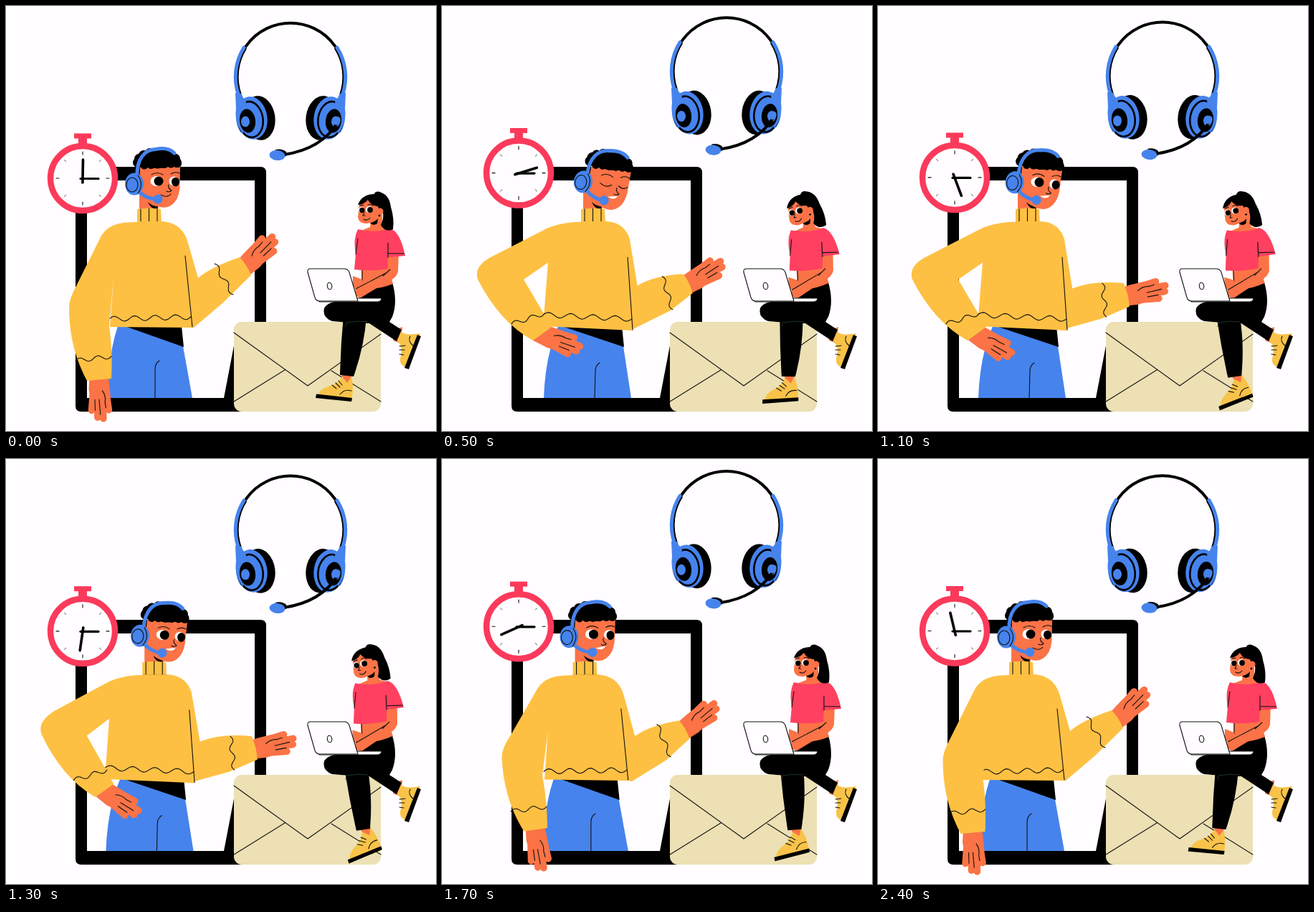
Animation, 600 px wide and 592 px high, one loop 2.5 s. Source, as an HTML page:

```html
<!DOCTYPE html>
<html lang="en">
<head>
<meta charset="utf-8">
<title>Customer support</title>
<style>
html, body { margin: 0; width: 100%; height: 100%; overflow: hidden; background: #fffdff; }
svg { display: block; width: 100vw; height: 100vh; }
.ink { fill: none; stroke: #111; stroke-width: 1.1; stroke-linecap: round; stroke-linejoin: round; }
.skin { fill: #fb7346; }
.blue { fill: #4683ec; }
.red { fill: #fb3a5b; }
.shirt { fill: #ff4060; }
.knit { fill: #fec043; }
.shoe { fill: #f8c348; }
.white { fill: #fffdff; }
.finger { fill: none; stroke: #fb7346; stroke-width: 9.5; stroke-linecap: round; }
.tube { fill: none; stroke: #4683ec; stroke-width: 5; stroke-linecap: round; }
</style>
</head>
<body>
<svg viewBox="0 0 600 592" preserveAspectRatio="none">
  <defs>
    <g id="hand">
      <path class="skin" d="M-10 -12L8 -14L26 -15L32 12L14 15L-10 13Z"/>
      <path class="finger" d="M18 -9L43 -12M22 -4L55 -4M22 3L53 4M16 9L43 12"/>
      <path class="ink" d="M16 -4Q24 -9 32 -7L40 -8M28 1L49 0M28 7L43 7"/>
    </g>
    <g id="cup">
      <ellipse cx="353.500" cy="156" rx="22" ry="31" transform="rotate(-8 353.500 156)"/>
      <g class="blue">
        <ellipse cx="343" cy="156" rx="21.500" ry="30" transform="rotate(-9 343 156)"/>
        <path d="M320 121L329 122Q329 129 338 132L328 177Q319 165 321 143Z"/>
        <ellipse cx="341" cy="158" rx="17.500" ry="25" transform="rotate(-9 341 158)" stroke="#000" stroke-width="2.600"/>
        <path d="M321 130L335 132L331 178Q319 165 321 143Z"/>
      </g>
      <ellipse cx="337" cy="160" rx="11" ry="16.500" transform="rotate(-7 337 160)"/>
      <ellipse class="blue" cx="334" cy="161" rx="6" ry="7.500"/>
    </g>
    <g id="band">
      <path d="M333.500 58A75.500 75.500 0 0 0 326 124" fill="none" stroke="#000" stroke-width="6"/>
      <path class="tube" d="M332 58A77 77 0 0 0 324.500 124"/>
    </g>
  </defs>

  <path fill-rule="evenodd" d="M105 224H355Q363 224 363 232V557Q363 565 355 565H105Q97 565 97 557V232Q97 224 105 224ZM113 243V546H347V243Z"/>
  <path d="M319 468L304 546V560H335V468Z"/>

  <g id="watch">
    <path class="red" d="M95 177.500H119V184.500H113V195H101V184.500H95Z"/>
    <circle cx="107" cy="240" r="45" class="white" stroke="#fb3a5b" stroke-width="8.500"/>
    <g id="ticks"></g>
    <path d="M104 240.500H129" stroke="#000" stroke-width="3.200" stroke-linecap="round"/>
    <path id="minute" d="M107 246V214" stroke="#000" stroke-width="3.600" stroke-linecap="round"/>
  </g>

  <g id="headset">
    <path d="M325 124A76 76 0 1 1 469 124" fill="none" stroke="#000" stroke-width="4"/>
    <use href="#band"/><use href="#band" transform="matrix(-1 0 0 1 794 0)"/>
    <use href="#cup"/><use href="#cup" transform="matrix(-1 0 0 1 794 0)"/>
    <path d="M463 162C447 188 422 202 388 207" fill="none" stroke="#000" stroke-width="4"/>
    <ellipse class="blue" cx="462" cy="160" rx="4.500" ry="6" transform="rotate(25 462 160)"/>
    <path d="M376 200Q385 198 391 203L391 209Q386 210 381 215Z"/>
    <ellipse class="blue" cx="378.500" cy="208" rx="11" ry="7" transform="rotate(6 378 208)"/>
  </g>

  <g id="man">
    <path id="pants" class="blue"/>
    <path id="belt"/>
    <path id="fold" class="ink"/>
    <use id="handR" href="#hand"/>
    <path id="sleeveR" class="knit"/>
    <g id="neck">
      <path class="skin" d="M186 255L212 268L213 285H186Z"/>
      <path d="M198 273Q204 279 212 279L211 283Q202 283 198 273Z"/>
      <path class="knit" d="M183 283Q200 280 216 283L217 304H183Z"/>
      <path class="ink" d="M188 283V300M199.500 282V301M211 283V300M184 301H216"/>
    </g>
    <path id="torso" class="knit"/>
    <path id="hem" class="ink"/>
    <path id="seam" class="ink"/>
    <path id="waveR" class="ink"/>
    <g id="armL">
      <use id="handL" href="#hand"/>
      <path id="sleeveL" class="knit"/>
      <path id="waveL" class="ink"/>
    </g>
    <g id="head">
      <path class="skin" d="M187 225L186 262Q198 275 211 279Q222 283 230 278Q241 271 242.500 253L243 222Q215 205 187 225Z"/>
      <g id="curls"></g>
      <g id="eyes">
        <ellipse class="white" cx="210" cy="244" rx="8.500" ry="7"/>
        <ellipse class="white" cx="234" cy="244" rx="6.500" ry="6.500"/>
        <circle cx="213" cy="244" r="6.500"/>
        <ellipse cx="236.500" cy="245" rx="5.500" ry="6.300"/>
      </g>
      <path id="lids" class="ink" d="M203 246Q212 252 219 246M229 246Q236 251 241 246"/>
      <path class="ink" d="M203 235Q211 230 219 235M230 234Q236 230 242 233M227 249Q225 253 231 257Q228 260 224 258"/>
      <path id="smile" class="ink" d="M216 263Q225 268 230 262"/>
      <path id="teeth" class="white" d="M216 263L230 260Q226 268 216 263Z"/>
      <path class="tube" d="M183 238C182 212 194 200 209 199.500Q226 196 235 205"/>
      <path class="tube" d="M184 257Q193 267 207 269"/>
      <circle class="blue" cx="212" cy="269" r="6.500"/>
      <ellipse class="blue" cx="179" cy="248" rx="13" ry="15.500"/>
      <ellipse class="ink" cx="176" cy="249" rx="8" ry="10"/>
      <path class="ink" d="M184 236Q193 248 184 261"/>
    </g>
  </g>

  <rect x="318" y="440" width="205" height="125" rx="11" fill="#ece0b4"/>
  <path class="ink" d="M318 455L421 529L523 457M318 551L389 507M454 508L523 551"/>

  <g id="woman">
    <g id="shin">
      <g id="foot">
        <path class="skin" d="M469 508H483L481 530H469Z"/>
        <path class="shoe" d="M469 516Q466 523 456 528Q438 532 435 543L482 548Q486 534 482 516L476 525Z"/>
        <path d="M433 540.500L483 546L482 551L432 546Z"/>
        <path class="ink" d="M455 528L461 533M460 525L466 531M464 522L469 528M466 541Q472 533 482 536"/>
      </g>
      <path d="M471 430L503 432Q500 474 485 516L466 514Q467 472 471 430Z"/>
    </g>
    <path class="skin" d="M540 452L553 447L551 470L540 466Z"/>
    <path class="shoe" d="M551 453Q556 460 578 456L558 503Q547 500 551 487Q554 474 546 467Z"/>
    <path d="M574 458L579 460L562 506L556 504Z"/>
    <path class="ink" d="M549 474L557 473M549 479L556 479M549 485L555 486M564 460Q560 467 569 474"/>
    <path d="M496 391L539 385Q547 412 539 433L535 440L552 451L545 467L507 442Q478 441 455 439Q441 434 444 421Q449 411 470 411H492Z"/>
    <path d="M474 447L475 441Q490 438 505 440" fill="none" stroke="#28432d" stroke-width=".8"/>
    <g id="bust">
      <path class="skin" d="M496 362H533L540 387Q515 397 496 392Z"/>
      <path class="ink" d="M497 367V383"/>
      <path class="skin" d="M484 376L497 381L499 397L484 392Z"/>
      <path class="skin" d="M533 342H548L547 370Q545 380 527 387L494 407L486 402L488 393L524 372Z"/>
      <path class="ink" d="M532 371L488 394M536 367L526 376"/>
      <path class="skin" d="M509 295L525 284L525 308L537 312Q515 321 492 314L508 308Z"/>
      <path d="M508 302Q515 301 519 296L518 303Q512 307 508 302Z"/>
      <path class="shirt" d="M491 311Q515 317 536 310Q550 314 557 348L533 350L532 366Q510 370 486 367L488 345Q484 325 491 311Z"/>
      <path class="ink" d="M533 344.500L555.500 345M533 330V350M491 324L488 346"/>
      <g id="face">
        <path d="M513 263Q516 256 524 260Q535 264 537 280Q542 296 540 311Q529 316 523 305Q530 292 522 274Z"/>
        <path class="skin" d="M493 273L491 294Q492 303 503 303Q513 303 520 291L523 275Q505 264 493 273Z"/>
        <path d="M491 277Q496 263 512 262Q527 262 529 275Q528 285 522 288L519 279Q509 278 505 270Q499 277 491 277Z"/>
        <circle class="skin" cx="522" cy="286" r="4.500"/>
        <circle cx="521" cy="292" r="1.400"/>
        <g id="look">
          <circle class="white" cx="496" cy="284" r="4.100"/>
          <circle class="white" cx="506.500" cy="283.500" r="4.500"/>
          <circle cx="496.800" cy="284.500" r="3.700"/>
          <circle cx="508" cy="284" r="3.900"/>
        </g>
        <path id="shut" class="ink" d="M493 286Q497 289 500 285M504 286Q509 288 512 284"/>
        <path class="ink" d="M494 278L499 277M505 277Q509 275 512 278M500 288L498 292H501M499 297Q504 300 508 295"/>
      </g>
    </g>
    <path class="ink" style="fill:#fffdff" d="M437 407H524Q524 412 518 412H437Z"/>
    <path class="ink" style="fill:#fffdff" d="M425 366H472Q477 366 479 371L491 411H437Q433 411 431 406L421 371Q420 366 425 366Z"/>
    <ellipse class="ink" cx="451.500" cy="390" rx="3.200" ry="4.800" transform="rotate(-8 451.500 390)"/>
  </g>
</svg>

<script>
const LOOP = 2500, STEP = 100;
const $ = id => document.getElementById(id);
const set = (id, name, value) => $(id).setAttribute(name, value);
const NUM = /-?\d+(\.\d+)?/g;
const nums = s => s.match(NUM).map(Number);

// Poses run: arm down, halfway, hand on hip.
const left = {
  sleeveL: [
    "M183 301C158 301 142 304 132 322L98 390Q88 408 88 420Q88 476 113 522L147 519Q149 480 144 446L150 380L200 330Z",
    "M180 302C160 302 148 305 138 312L84 353Q54 378 57 394Q78 468 122 499L147 486Q134 445 117 411L134 384L190 330Z",
    "M192 301C178 300 160 304 146 309L64 351Q42 364 48 381Q78 440 125 466L151 447Q132 415 112 381L148 356L200 330Z"],
  waveL: ["97 494 147 488", "91 474 140 462", "95 443 141 428"],
  handL: ["130 520 88", "134 491 49", "138 457 32"]
};
const body = {
  torso: [
    "M183 300L217 300C240 301 250 315 254 330L268 379L262 448L145 447L150 380Z",
    "M180 301L215 301C238 302 247 312 252 325L267 392L259 448L132 444L134 384Z",
    "M192 300L227 300C247 301 256 312 260 325L271 392L264 452L139 446L146 357Z"],
  hem: ["144 436 258 433", "132 431 256 434", "139 430 263 436"],
  seam: ["M250 348L260 447", "M249 348L258 447", "M257 350L264 451"],
  pants: [
    "M156 446L240 446L247 474L260 546L142 546Q142 488 156 446Z",
    "M154 446L238 446L245 474L259 546L136 546Q138 488 154 446Z",
    "M160 446L246 446L251 474L262 546L140 546Q142 488 160 446Z"],
  belt: ["M166 446L245 446L248 475Z", "M163 446L243 446L246 475Z", "M165 446L249 446L252 475Z"],
  fold: ["M214 494Q208 498 208 506L208 546", "M213 494Q207 498 207 506L207 546", "M218 497Q212 501 212 508L211 546"],
  neck: ["0 0", "-3 1", "9 0"]
};
// Poses run: raised, halfway, offering.
const right = {
  sleeveR: [
    "M240 350L268 379Q285 364 326 350Q336 360 342 375L302 414L262 448L235 440Z",
    "M245 350L271 389Q290 375 333 371Q343 382 347 397L318 422L266 450L240 440Z",
    "M245 350L268 396Q302 384 346 391Q352 408 352 426L310 440L250 452L240 440Z"],
  waveR: ["291 359 317 402", "304 375 320 421", "316 390 318 437"],
  handR: ["334 362 -43", "340 384 -34", "350 410 -3"]
};

function mix(a, b, k) {
  const end = nums(b);
  let i = 0;
  return a.replace(NUM, n => (+n + (end[i++] - n) * k).toFixed(2));
}
function pose(list, u) {
  const i = Math.max(0, Math.min(list.length - 2, Math.floor(u)));
  return mix(list[i], list[i + 1], u - i);
}
// Eased value of a list of [time, value] keys.
function track(t, ...keys) {
  const i = keys.findIndex(k => k[0] > t);
  if (i < 0) return keys[keys.length - 1][1];
  if (i === 0) return keys[0][1];
  const [t0, v0] = keys[i - 1], [t1, v1] = keys[i];
  const x = (t - t0) / (t1 - t0);
  return v0 + (v1 - v0) * x * x * (3 - 2 * x);
}
function wave(ends, cycles, amp) {
  const [x1, y1, x2, y2] = nums(ends);
  const dx = x2 - x1, dy = y2 - y1, len = Math.hypot(dx, dy);
  let d = "";
  for (let s = 0; s <= 48; s++) {
    const k = s / 48, o = amp * Math.sin(k * cycles * 2 * Math.PI);
    d += (s ? "L" : "M") + (x1 + dx * k + dy / len * o).toFixed(1) + " " + (y1 + dy * k - dx / len * o).toFixed(1);
  }
  return d;
}
function place(id, text, twist = 0) {
  const [x, y, a] = nums(text);
  set(id, "transform", `translate(${x} ${y}) rotate(${a + twist})`);
}
function show(id, on) { $(id).style.display = on ? "" : "none"; }

let ticks = "", curls = '<ellipse cx="211" cy="213" rx="30" ry="13"/>';
for (let a = 0; a < 360; a += 45) {
  const main = a % 90 === 0;
  ticks += `<path class="ink" d="M107 ${main ? 203 : 204}V207" opacity="${main ? 1 : .5}" transform="rotate(${a} 107 240)"/>`;
}
for (let i = 0; i <= 8; i++) {
  const a = Math.PI * (1 + i / 8);
  curls += `<circle cx="${211 + 27 * Math.cos(a)}" cy="${218 + 14 * Math.sin(a)}" r="7"/>`;
}
for (let i = 0; i < 6; i++) curls += `<circle cx="${193 + i * 9.3}" cy="${222 - i * .5}" r="5.5"/>`;
$("ticks").innerHTML = ticks;
$("curls").innerHTML = curls;

function draw(t) {
  const turn = 2 * Math.PI * t / LOOP;
  const bob = `translate(0 ${4.1 * (Math.cos(2 * turn) - 1)})`;
  set("watch", "transform", bob);
  set("headset", "transform", bob);
  set("minute", "transform", `rotate(${360 * t / LOOP + 1} 107 240.5)`);

  const u = track(t, [0, 0], [450, 2], [1200, 2], [1800, 0]);
  const v = track(t, [150, 0], [800, 2], [900, 2], [1100, 1.75], [1500, 1.75], [1900, -.4], [2050, -.4], [2350, 0]);
  const bodyAt = list => t < 1000 ? mix(list[0], list[2], u / 2) : pose(list, u);
  const sway = track(t, [200, 0], [450, 2], [550, 2], [800, 0]);

  for (const id of ["torso", "seam", "pants", "belt", "fold"]) set(id, "d", bodyAt(body[id]));
  set("hem", "d", wave(bodyAt(body.hem), 4, 3.5));
  set("neck", "transform", `translate(${bodyAt(body.neck)})`);
  set("sleeveL", "d", pose(left.sleeveL, u));
  set("waveL", "d", wave(pose(left.waveL, u), 2, 3));
  place("handL", pose(left.handL, u), -5 * sway);
  set("sleeveR", "d", pose(right.sleeveR, v));
  set("waveR", "d", wave(pose(right.waveR, v), 2, 3));
  place("handR", pose(right.handR, v));

  set("man", "transform", `translate(${sway} 0)`);
  set("armL", "transform", `translate(${track(t, [1700, 0], [2000, 2.5], [2400, 2.5], [2500, 0])} 0)`);
  const hx = track(t, [0, 0], [450, 12], [550, 12], [800, 9], [1200, 9], [1500, -3], [2000, 0]);
  const tilt = track(t, [0, 0], [450, 9], [550, 9], [800, 6.5], [1200, 6.5], [1500, 1.5], [2000, 0]);
  set("head", "transform", `translate(${hx} ${tilt * .2}) rotate(${tilt} 212 270)`);

  const manBlink = t >= 400 && t < 600, womanBlink = t >= 1400 && t < 1600;
  show("eyes", !manBlink);
  show("lids", manBlink);
  show("look", !womanBlink);
  show("shut", womanBlink);
  const grin = t >= 400 && t < 2100;
  show("teeth", grin);
  show("smile", !grin);

  const swing = (1 - Math.cos(turn)) / 2;
  set("shin", "transform", `translate(${3 * swing} 0) rotate(${-14.5 * swing} 491 437)`);
  set("foot", "transform", `translate(${3 * swing} 0) rotate(${-14 * swing} 476 512)`);
  const bend = track(t, [0, 0], [450, 1], [1200, 1], [1700, 0]);
  set("bust", "transform", `rotate(${-3 * bend} 515 390)`);
  set("face", "transform", `rotate(${-9 * bend} 510 305)`);
}

const start = performance.now();
function tick() {
  const t = (performance.now() - start) % LOOP;
  draw(Math.floor(t / STEP) * STEP);
  requestAnimationFrame(tick);
}
tick();
</script>
</body>
</html>
```
